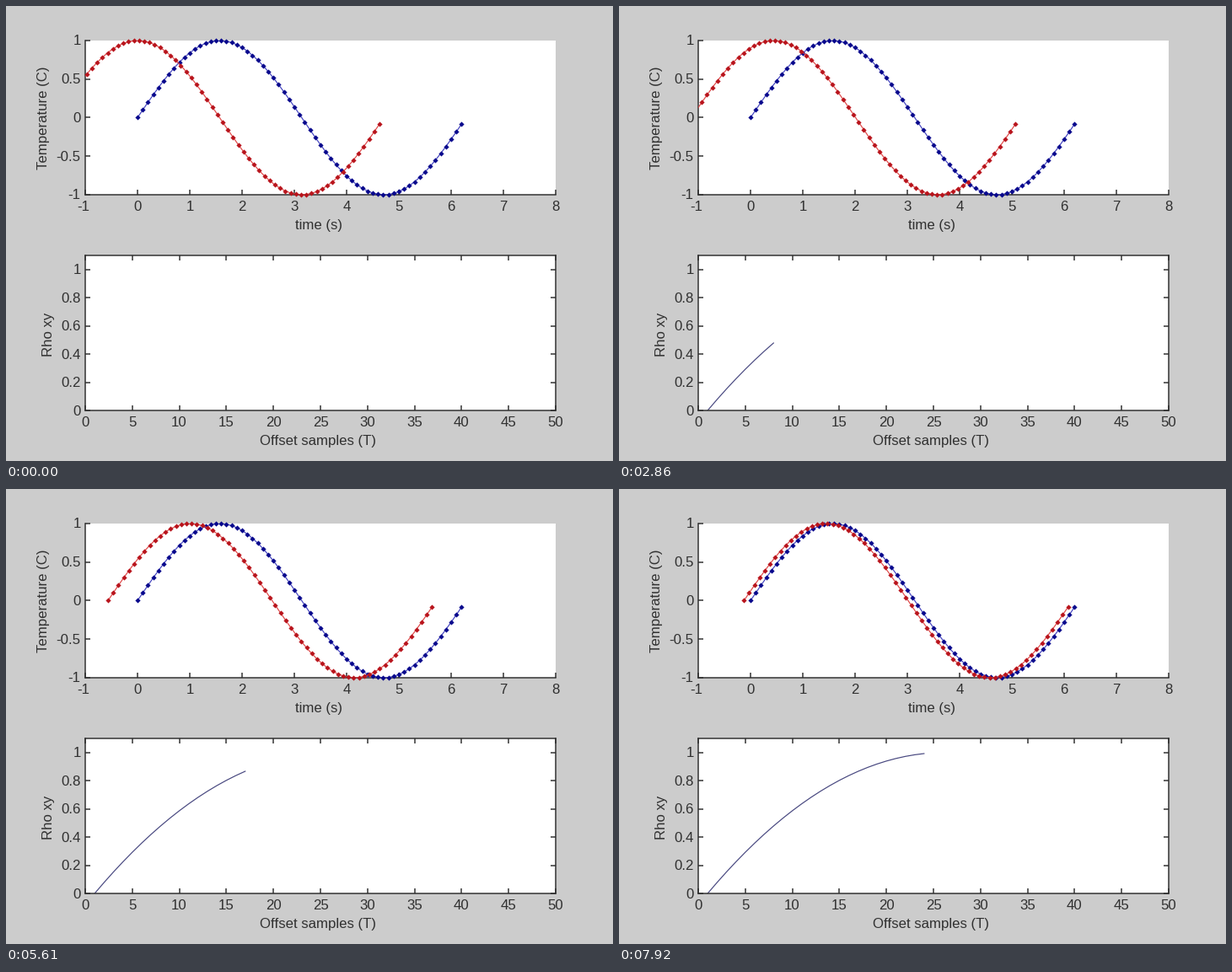
Write a matplotlib script that moves like this. It is 720 px wide and 540 px high and loops after 8000 ms.

```python
import numpy as np
import matplotlib.pyplot as plt
from matplotlib.animation import FuncAnimation

W, H, DPI = 720, 540, 100
LOOP, TICK, HOLD = 8000, 40, 330   # ms: loop, redraw interval, time per offset
PX = 72 / DPI                      # points per pixel
INK = "#303030"
EDGE = 1.5 * PX

plt.rcParams["font.family"] = "Liberation Sans"
plt.rcParams["font.size"] = 12.1

fig = plt.figure(figsize=(W / DPI, H / DPI), dpi=DPI, facecolor="#cccccc")


def make_axes(left, top, right, bottom, xlim, ylim):
    ax = fig.add_axes([left / W, 1 - bottom / H, (right - left) / W, (bottom - top) / H])
    ax.set(xlim=xlim, ylim=ylim, facecolor="white")
    for spine in ax.spines.values():
        spine.set(linewidth=EDGE, color=INK)
    return ax


def label(x, y, text, ha="center", va="baseline", rotation=0):
    fig.text(x / W, 1 - y / H, text, ha=ha, va=va, rotation=rotation, color=INK)


def add_ticks(ax, xticks, yticks, base, boxed):
    ax.set_xticks(xticks)
    ax.set_yticks(yticks)
    ax.tick_params(direction="in", length=6 * PX, width=EDGE, color=INK,
                   top=boxed, right=boxed, labelleft=False, labelbottom=False)
    for v in xticks:
        x, _ = ax.transData.transform((v, 0))
        label(x - (2 if v < 0 else 0), base, f"{v:g}")
    for v in yticks:
        _, y = ax.transData.transform((0, v))
        label(88.7, H - y + 5.5, f"{v:g}", ha="right")


wave = make_axes(94, 41, 652, 224, (-1, 8), (-1, 1))
wave.spines[["top", "right"]].set_visible(False)
add_ticks(wave, range(-1, 9), [-1, -0.5, 0, 0.5, 1], 243, False)
label(371, 264.5, "time (s)")
label(44, 133, "Temperature (C)", va="center", rotation=90)

corr = make_axes(94, 296, 652, 480, (0, 50), (0, 1.1))
add_ticks(corr, range(0, 51, 5), [0, 0.2, 0.4, 0.6, 0.8, 1], 499, True)
label(370.5, 520.5, "Offset samples (T)")
label(50, 389.5, "Rho xy", va="center", rotation=90)

t = np.arange(63) * 0.1
y = np.sin(t)


def make_series(line_color, dot_color, z):
    line, = wave.plot(t, y, color=line_color, lw=1.2 * PX, zorder=z)
    dots, = wave.plot(t, y, "D", color=dot_color, ms=4.4 * PX, mew=0,
                      clip_on=False, zorder=z + 0.1)
    return line, dots


make_series("#4444c0", "#08088c", 3)
red_line, red_dots = make_series("#e04848", "#b8141c", 4)
rho_line, = corr.plot([], [], color="#484880", lw=1.2 * PX)


def rho(k):
    return 1 - (1 - (k - 1) / 25.2) ** 2


def update(i):
    k = max(1, (i * TICK + 30) // HOLD)
    x = t - np.pi / 2 + (k - 1) * np.pi / 50
    red_line.set_data(x, y)
    red_dots.set_data(x[x >= -1], y[x >= -1])
    offsets = np.arange(1, k + 1)
    rho_line.set_data(offsets, rho(offsets))
    return red_line, red_dots, rho_line


anim = FuncAnimation(fig, update, frames=LOOP // TICK, init_func=lambda: update(0),
                     interval=TICK, repeat=True, repeat_delay=0, blit=False)
plt.show()
```
